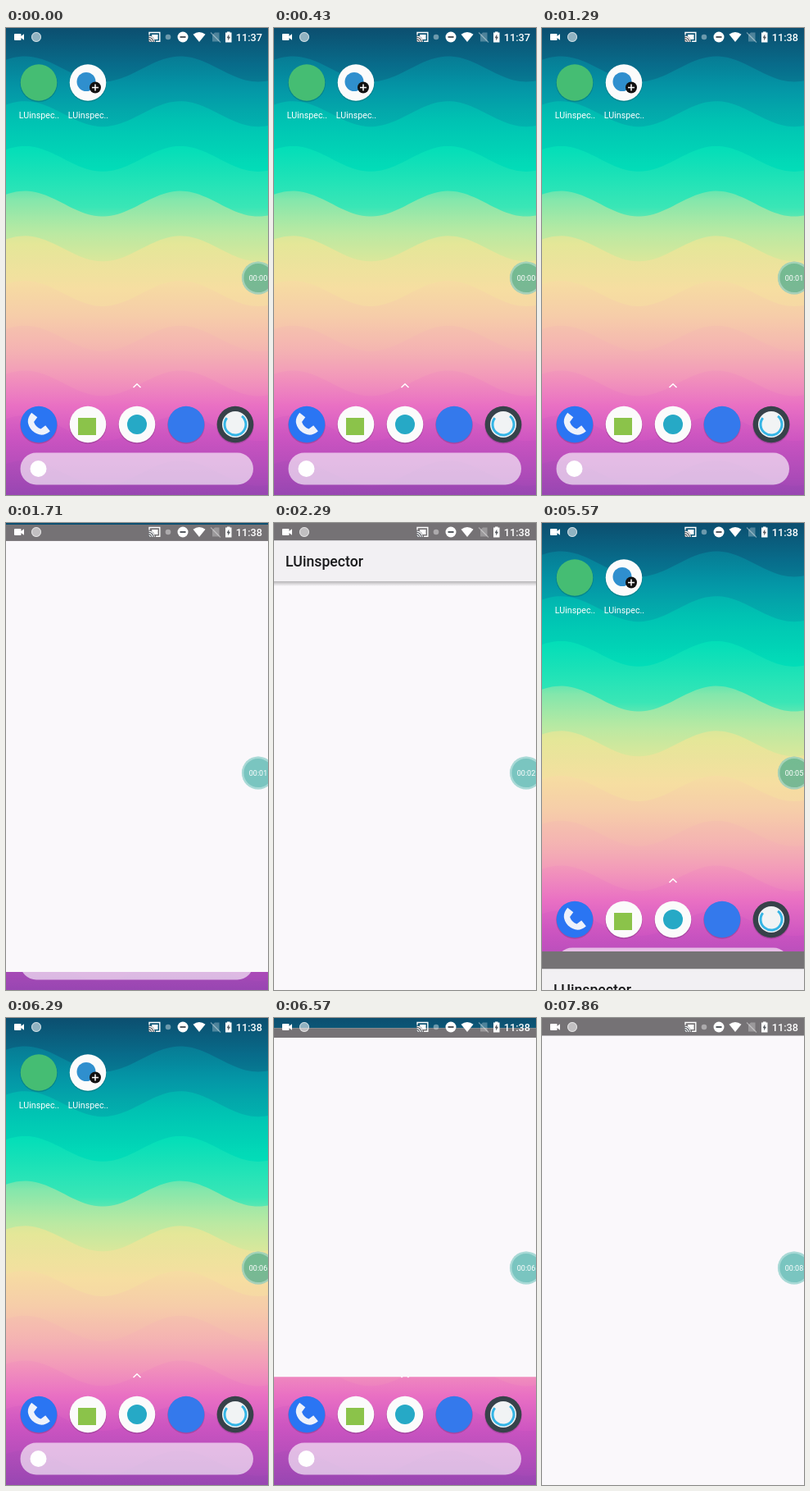
Animation of 320x569 px, one loop 8 s. Source, as an HTML page with a canvas:

```html
<!DOCTYPE html>
<html lang="en">
<head>
<meta charset="utf-8">
<title>Phone launcher</title>
<style>
  html, body { margin: 0; width: 100%; height: 100%; overflow: hidden; }
  canvas { display: block; width: 100vw; height: 100vh; }
</style>
</head>
<body>
<canvas id="stage"></canvas>
<script>
const W = 320, H = 569, LOOP = 8000, STEP = 1000 / 7, TAU = Math.PI * 2;
const APP_NAME = 'LUinspector', APP_LABEL = 'LUinspec..';
const FONT = 'Roboto, sans-serif';
const canvas = document.getElementById('stage');
const ctx = canvas.getContext('2d');

const clamp = v => Math.max(0, Math.min(1, v));
const easeOut = p => 1 - (1 - clamp(p)) ** 3;
const easeInOut = p => (p = clamp(p)) < 0.5 ? 2 * p * p : 1 - 2 * (1 - p) ** 2;
const mix = (a, b, p) => a + (b - a) * p;

// Wallpaper colours: y, r, g, b
const SKY = [
  [0, 14, 70, 103], [35, 8, 106, 137], [75, 4, 150, 166], [120, 0, 195, 179],
  [160, 2, 222, 184], [212, 64, 231, 182], [215, 118, 230, 174], [245, 184, 233, 163],
  [275, 228, 231, 152], [310, 246, 222, 161], [350, 246, 205, 169], [400, 244, 174, 180],
  [430, 241, 145, 188], [460, 233, 112, 195], [500, 204, 84, 193], [569, 152, 70, 178]
];

function skyColor(y) {
  y = Math.max(0, Math.min(H, y));
  const i = Math.max(1, SKY.findIndex(s => s[0] >= y));
  const a = SKY[i - 1], b = SKY[i], p = (y - a[0]) / (b[0] - a[0]);
  return `rgb(${[1, 2, 3].map(k => Math.round(mix(a[k], b[k], p)))})`;
}

function circle(x, y, r, fill) {
  ctx.fillStyle = fill;
  ctx.beginPath();
  ctx.arc(x, y, r, 0, TAU);
  ctx.fill();
}

function rect(x, y, w, h, fill) {
  ctx.fillStyle = fill;
  ctx.fillRect(x, y, w, h);
}

function line(points, color, width) {
  ctx.strokeStyle = color;
  ctx.lineWidth = width;
  ctx.beginPath();
  points.forEach(p => ctx.lineTo(...p));
  ctx.stroke();
}

function arc(x, y, r, from, to, color, width) {
  ctx.strokeStyle = color;
  ctx.lineWidth = width;
  ctx.beginPath();
  ctx.arc(x, y, r, from, to);
  ctx.stroke();
}

function polygon(points, fill) {
  ctx.fillStyle = fill;
  ctx.beginPath();
  points.forEach(p => ctx.lineTo(...p));
  ctx.fill();
}

function text(str, x, y, size, color, weight = 400, align = 'left') {
  ctx.font = `${weight} ${size}px ${FONT}`;
  ctx.textAlign = align;
  ctx.textBaseline = 'alphabetic';
  ctx.fillStyle = color;
  ctx.fillText(str, x, y);
}

// Each wave runs slightly ahead of the sky at its crest and behind it below,
// which leaves a visible edge; the lower waves are fainter.
function wallpaper() {
  const spacing = 54.7;
  for (let i = -1; i < 10; i++) {
    const mid = 50 + spacing * i, top = mid - 16, bottom = mid + 70;
    const lead = i < 5 ? 16 : 5;
    const fill = ctx.createLinearGradient(0, top, 0, bottom);
    for (let k = 0; k <= 1; k += 0.125) {
      fill.addColorStop(k, skyColor(mix(top + lead, bottom - lead, k)));
    }
    const edge = [[0, H]];
    for (let x = 0; x <= W; x += 4) {
      edge.push([x, i < 0 ? 0 : mid - 15.5 * Math.cos((x - 23) / 190 * TAU)]);
    }
    polygon([...edge, [W, H]], fill);
  }
}

function iconDisc(x, y, fill) {
  circle(x, y + 1, 22.8, 'rgba(0,0,0,.16)');
  circle(x, y, 22.3, fill);
}

function handset(x, y) {
  ctx.save();
  ctx.translate(x, y);
  ctx.rotate(Math.PI / 4);
  ctx.fillStyle = '#eef2fb';
  ctx.beginPath();
  ctx.moveTo(-16, -5);
  ctx.lineTo(-7, -6);
  ctx.lineTo(-6, 1);
  ctx.quadraticCurveTo(0, 4, 6, 1);
  ctx.lineTo(7, -6);
  ctx.lineTo(16, -5);
  ctx.quadraticCurveTo(15, 9, 0, 10);
  ctx.quadraticCurveTo(-15, 9, -16, -5);
  ctx.fill();
  ctx.restore();
}

function home() {
  wallpaper();
  iconDisc(40, 66.5, '#45bd73');
  iconDisc(100, 66.5, '#fbfbfb');
  circle(98, 65.5, 11.5, '#2f8fce');
  circle(109, 72.5, 7, '#111');
  rect(105, 71.8, 8, 1.5, '#fff');
  rect(108.25, 68.5, 1.5, 8, '#fff');
  text(APP_LABEL, 40.5, 110, 10.7, '#fff', 400, 'center');
  text(APP_LABEL, 100.5, 110, 10.7, '#fff', 400, 'center');

  line([[155.5, 438], [160, 433.7], [164.5, 438]], '#fff', 1.5);

  const y = 483;
  iconDisc(40, y, '#2a75f3');
  handset(39, 483.5);
  iconDisc(100, y, '#fbfbfb');
  rect(88, 475, 22, 21, '#8bc34a');
  iconDisc(160, y, '#fbfbfb');
  circle(160, y, 12, '#26a9c6');
  iconDisc(220, y, '#3479ec');
  iconDisc(280, y, '#37424a');
  circle(280, y, 16, '#f1f3f4');
  arc(280, y, 13, -0.9, 3.8, '#35b5e5', 3);

  ctx.fillStyle = 'rgba(255,255,255,.62)';
  ctx.beginPath();
  ctx.roundRect(17.5, 517.5, 284.5, 39, 19.5);
  ctx.fill();
  circle(39.5, 537, 10, '#fff');
}

function appWindow(headerAlpha) {
  rect(0, 0, W, H, '#faf8fb');
  rect(0, 0, W, 21.5, '#757275');
  if (headerAlpha <= 0) return;
  ctx.save();
  ctx.globalAlpha *= headerAlpha;
  const shadow = ctx.createLinearGradient(0, 71, 0, 77);
  shadow.addColorStop(0, 'rgba(0,0,0,.27)');
  shadow.addColorStop(1, 'rgba(0,0,0,0)');
  rect(0, 71, W, 6, shadow);
  rect(0, 21.5, W, 49.5, '#f2f0f3');
  text(APP_NAME, 14, 53, 17.7, '#19191b', 500);
  ctx.restore();
}

// The clip grows from the first icon to the full screen, sideways first.
function revealApp(t, start, headerAlpha) {
  const p = (t - start) / 490;
  if (p <= 0) return;
  const down = easeOut(p), side = easeOut(p * 3);
  const left = mix(18, 0, side), right = mix(62, W, side);
  const top = mix(45, 0, down), bottom = mix(90, H, down);
  ctx.save();
  ctx.globalAlpha = clamp(p * 4);
  ctx.beginPath();
  ctx.rect(left, top, right - left, bottom - top);
  ctx.clip();
  ctx.translate(0, 9 * (1 - down));
  appWindow(headerAlpha);
  ctx.restore();
}

function slideAppDown(t) {
  const y = H * easeInOut((t - 5230) / 429);
  if (y >= H) return;
  ctx.save();
  ctx.translate(0, Math.round(y));
  appWindow(1);
  ctx.restore();
}

function statusBar(t) {
  const white = '#fff', dim = 'rgba(255,255,255,.4)';
  ctx.fillStyle = white;
  ctx.beginPath();
  ctx.roundRect(10, 7, 8.5, 8, 1);
  ctx.fill();
  polygon([[18, 10.3], [22, 7.3], [22, 14.7], [18, 11.7]], white);

  circle(37, 11, 6, 'rgba(255,255,255,.55)');
  arc(37, 11, 5.5, 0, TAU, 'rgba(255,255,255,.6)', 1);

  line([[175, 8.5], [175, 5.5], [187.8, 5.5], [187.8, 16.3], [183, 16.3]], white, 1.4);
  rect(178, 8, 7.5, 6, white);
  ctx.save();
  ctx.beginPath();
  ctx.rect(174.3, 9, 10, 8);
  ctx.clip();
  circle(174.3, 17, 7.8, '#5c6066');
  for (const r of [2, 4.4, 6.8]) arc(174.3, 17, r, -Math.PI / 2, 0, white, 1.2);
  ctx.restore();

  circle(198, 11, 3.3, dim);
  circle(216, 11, 6.5, white);
  rect(212.5, 10, 7, 2, '#555a60');

  ctx.fillStyle = white;
  ctx.beginPath();
  ctx.moveTo(236, 17);
  ctx.lineTo(228.5, 7.8);
  ctx.quadraticCurveTo(236, 2.4, 243.5, 7.8);
  ctx.fill();

  polygon([[252, 8.5], [255, 5.5], [260.5, 5.5], [260.5, 16.5], [252, 16.5]], 'rgba(255,255,255,.28)');
  line([[250, 5.5], [262, 17.5]], dim, 1.2);

  rect(270, 4.5, 3.5, 2, white);
  rect(268, 5.5, 7.5, 12, white);
  polygon([[272.3, 7.5], [269.6, 12.2], [271.3, 12.2], [271.1, 15.6], [274, 10.8], [272.3, 10.8]], '#55595f');

  text(t < 1280 ? '11:37' : '11:38', 313, 15.5, 12.7, white, 500, 'right');
}

function recordBubble(t) {
  const seconds = Math.floor((t + 144) / 1000);
  circle(308, 304.5, 20, 'rgba(0,150,136,.51)');
  arc(308, 304.5, 18.8, 0, TAU, 'rgba(255,255,255,.34)', 2.4);
  text('00:0' + seconds, 308, 308, 9, '#fff', 400, 'center');
}

function draw(t) {
  home();
  if (t < 5230) revealApp(t, 1400, clamp((t - 1950) / 300));
  else if (t < 6400) slideAppDown(t);
  else revealApp(t, 6400, 0);
  statusBar(t);
  recordBubble(t);
}

function frame(now) {
  const ratio = window.devicePixelRatio || 1;
  const w = Math.round(innerWidth * ratio), h = Math.round(innerHeight * ratio);
  if (canvas.width !== w || canvas.height !== h) {
    canvas.width = w;
    canvas.height = h;
  }
  ctx.setTransform(w / W, 0, 0, h / H, 0, 0);
  // The screen advances seven times a second.
  draw(Math.floor((now % LOOP + 5) / STEP) * STEP % LOOP);
  requestAnimationFrame(frame);
}
requestAnimationFrame(frame);
</script>
</body>
</html>
```
